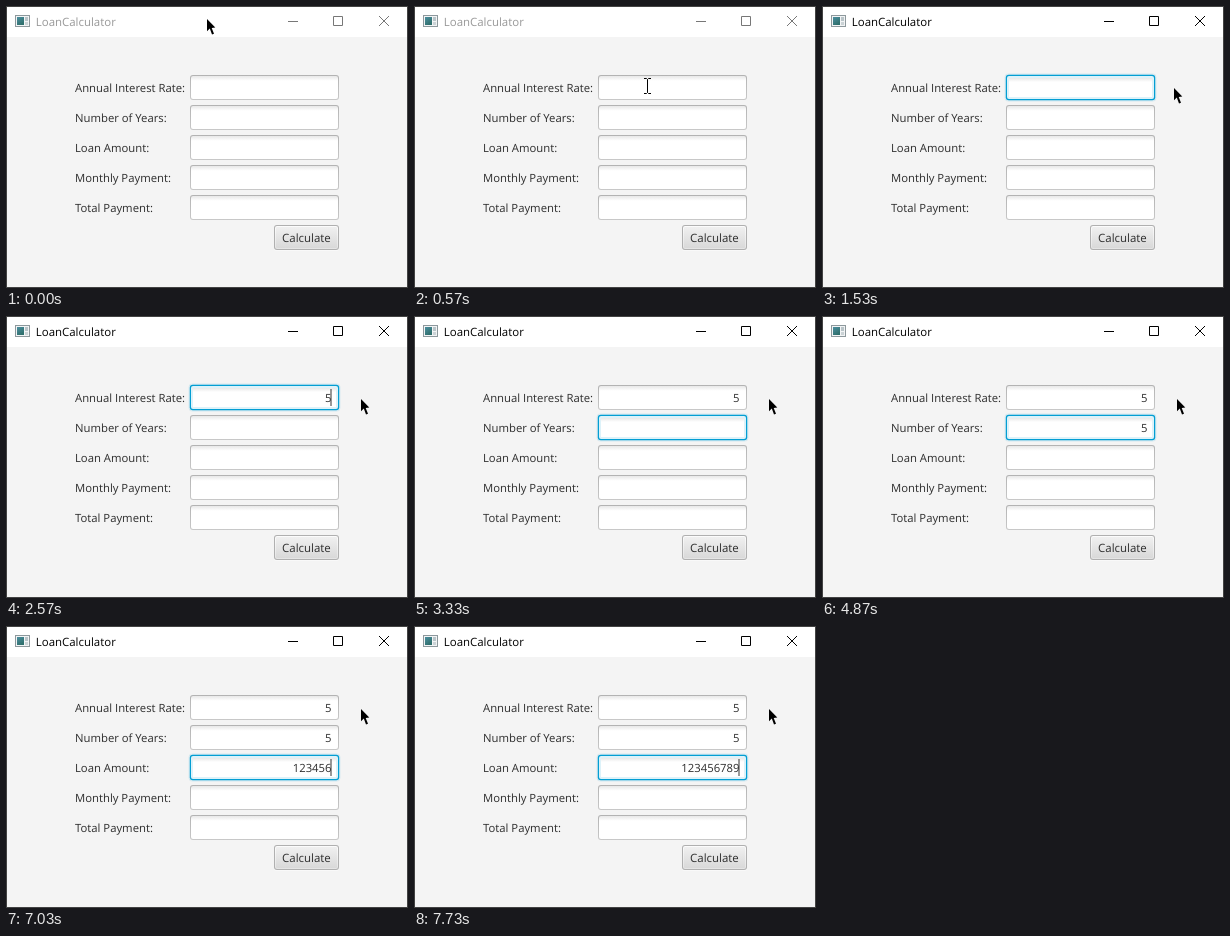
An HTML page for the animation above (8 s loop, 402 by 282 pixels).

```html
<!DOCTYPE html>
<html lang="en">
<head>
<meta charset="utf-8">
<title>LoanCalculator</title>
<style>
  html, body { margin: 0; width: 100%; height: 100%; overflow: hidden; background: #f4f4f4; }
  svg { display: block; width: 402px; height: 282px; }
  text {
    font-family: "Open Sans", "Noto Sans", sans-serif;
    font-size: 11.3px;
    fill: #2d2d2d;
    text-rendering: geometricPrecision;
  }
  #title { font-size: 11.45px; fill: #999; }
  #controls { fill: none; stroke: #777; }
  .active #title { fill: #000; }
  .active #controls { stroke: #000; }
  .value { text-anchor: end; }
  .button { font-size: 11.45px; text-anchor: middle; }
</style>
</head>
<body>
<svg id="stage" viewBox="0 0 402 282">
  <defs>
    <linearGradient id="edge" x2="0" y2="1">
      <stop stop-color="#b3b3b3"/><stop offset="1" stop-color="#c8c8c8"/>
    </linearGradient>
    <linearGradient id="inner" x2="0" y2="1">
      <stop stop-color="#e8e8e8"/><stop offset=".21" stop-color="#fff"/>
    </linearGradient>
    <linearGradient id="rim" x2="0" y2="1">
      <stop stop-color="#fcfcfc"/><stop offset="1" stop-color="#e4e4e4"/>
    </linearGradient>
    <linearGradient id="face" x2="0" y2="1">
      <stop stop-color="#f0f0f0"/><stop offset="1" stop-color="#d9d9d9"/>
    </linearGradient>
    <linearGradient id="pane" x2=".6" y2="1">
      <stop stop-color="#4d8fa0"/><stop offset="1" stop-color="#2f6f6c"/>
    </linearGradient>
  </defs>

  <rect width="402" height="282" fill="#434343"/>
  <rect x="1" y="1" width="400" height="280" fill="#f4f4f4"/>
  <rect x="1" y="1" width="400" height="30" fill="#fff"/>

  <g id="icon">
    <rect x="9.5" y="9.5" width="14" height="11" fill="#f2f4f5" stroke="#8d989c"/>
    <rect x="11" y="11" width="7" height="8" fill="url(#pane)"/>
    <rect x="19" y="11" width="3" height="4" fill="#b9c4c8"/>
    <rect x="19" y="16" width="3" height="3" fill="#cbd3d6"/>
  </g>
  <text id="title" x="29.8" y="20">LoanCalculator</text>
  <g id="controls">
    <path d="M282 15.5h10M327.5 10.5h9v9h-9z"/>
    <path d="M373 10l10 10M383 10l-10 10"/>
  </g>

  <g id="form"></g>

  <rect x="268" y="220" width="65" height="25" rx="3" fill="#fff" opacity=".5"/>
  <rect x="268" y="219" width="65" height="25" rx="3" fill="#b0b0b0"/>
  <rect x="269" y="220" width="63" height="23" rx="2" fill="url(#rim)"/>
  <rect x="270" y="221" width="61" height="21" rx="1" fill="url(#face)"/>
  <text class="button" x="300.4" y="236">Calculate</text>

  <rect id="caret" x="324.5" width="1" height="17" fill="#333"/>
  <path id="arrow" d="M0 0V12.2L2.8 9.6L5 15.5L7 14.7L4.7 8.9L8.3 8.6Z" fill="#000"/>
  <path id="beam" d="M-3.5-7.5h2.5l1 1l1-1h2.5M0-6.5v13M-3.5 7.5h2.5l1-1l1 1h2.5"
        fill="none" stroke="#000"/>
</svg>
<script>
const LOOP = 8000;
const ROW = 30;
const LABELS = ["Annual Interest Rate:", "Number of Years:", "Loan Amount:",
                "Monthly Payment:", "Total Payment:"];

// Each table lists [start in ms, state...]
const POINTER = [
  [0, 201, 13, "arrow"], [230, 203, 20, "arrow"], [270, 207, 36, "arrow"],
  [300, 213, 57, "arrow"], [330, 221, 82, "beam"], [370, 228, 101, "beam"],
  [400, 232, 106, "beam"], [470, 233, 101, "beam"], [530, 233, 87, "beam"],
  [570, 233, 80, "beam"], [1200, 252, 81, "beam"], [1230, 262, 81, "beam"],
  [1270, 276, 81, "beam"], [1300, 291, 81, "beam"], [1330, 307, 81, "beam"],
  [1370, 322, 81, "beam"], [1430, 338, 81, "arrow"], [1500, 352, 82, "arrow"],
  [1670, 355, 83, "arrow"]
];
const FOCUS = [[0, -1], [970, 0], [2830, 1], [5370, 2]];
const CARET = [[0, 0], [1030, 1], [1530, 0], [2030, 1], [3330, 0], [3830, 1],
               [4330, 0], [4370, 1], [4870, 0], [5370, 1], [5870, 0], [6030, 1]];
const KEYS = [
  { text: "5", times: [2570] },
  { text: "5", times: [4370] },
  { text: "123456789", times: [6030, 6130, 6230, 6500, 6770, 7030, 7230, 7500, 7730] }
];

const $ = id => document.getElementById(id);
const at = (table, t) => table.findLast(step => step[0] <= t);
const show = (el, on) => el.setAttribute("visibility", on ? "visible" : "hidden");

const box = (y, inset, radius, fill) =>
  `<rect x="${184 + inset}" y="${y + inset}" width="${149 - 2 * inset}"
    height="${25 - 2 * inset}" rx="${radius}" fill="${fill}"/>`;

$("form").innerHTML = LABELS.map((label, i) => {
  const y = 69 + i * ROW;
  return `<text x="69" y="${y + 17}">${label}</text>
    <g class="plain">${box(y, 0, 3, "url(#edge)")}${box(y, 1, 2, "url(#inner)")}</g>
    <g class="focused">${box(y, -0.2, 3, "#039ed3")}${box(y, 1, 2, "#fff")}
      ${box(y, -1.4, 4, "#039ed322")}${box(y, 3, 0, "url(#inner)")}</g>
    <text class="value" x="325.5" y="${y + 17}"></text>`;
}).join("");

const plain = document.querySelectorAll(".plain");
const focused = document.querySelectorAll(".focused");
const values = document.querySelectorAll(".value");

function draw(t) {
  const [, focus] = at(FOCUS, t);
  const [, caretOn] = at(CARET, t);
  const [, x, y, shape] = at(POINTER, t);

  $("stage").classList.toggle("active", t >= 930);
  LABELS.forEach((_, i) => {
    show(plain[i], i !== focus);
    show(focused[i], i === focus);
  });
  KEYS.forEach(({ text, times }, i) => {
    values[i].textContent = text.slice(0, times.filter(time => time <= t).length);
  });

  show($("caret"), caretOn);
  $("caret").setAttribute("y", 73 + Math.max(focus, 0) * ROW);

  for (const name of ["arrow", "beam"]) show($(name), name === shape);
  const half = shape === "beam" ? 0.5 : 0;
  $(shape).setAttribute("transform", `translate(${x + half} ${y})`);
}

const start = performance.now();
function tick() {
  draw((performance.now() - start) % LOOP);
  requestAnimationFrame(tick);
}
tick();
</script>
</body>
</html>
```
